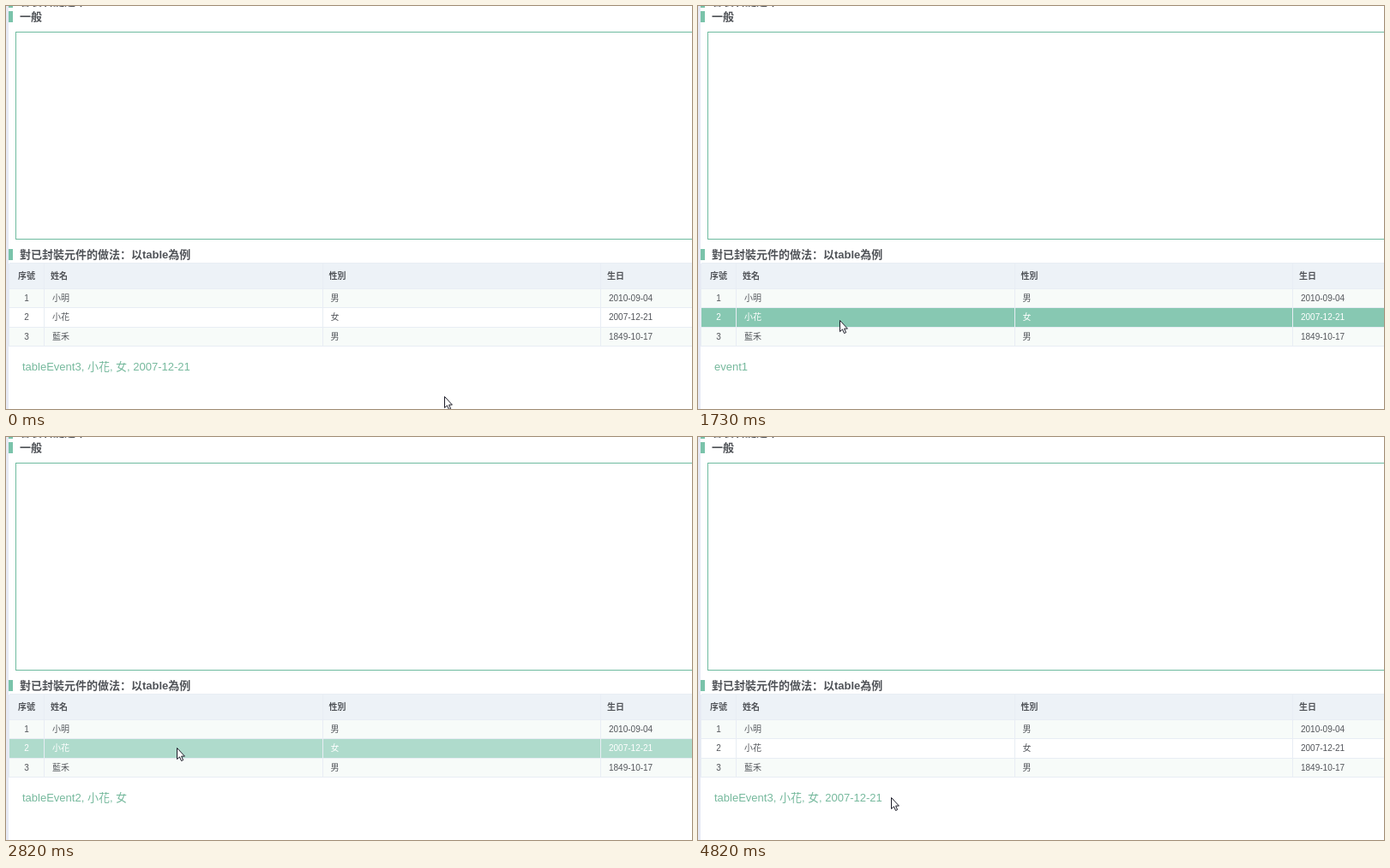
Animation, 800 px wide and 471 px high, one loop 6000 ms. Source, as an HTML page:

```html
<!DOCTYPE html>
<html lang="zh-Hant">
<head>
<meta charset="utf-8">
<title>Context menu</title>
<style>
html, body { margin: 0; width: 100%; height: 100%; overflow: hidden; background: #fff; }
svg { display: block; width: 800px; height: 471px; }
text { font: 10px "Liberation Sans", "Noto Sans CJK TC", "Noto Sans CJK", sans-serif; fill: #53565b; white-space: pre; }
.title { font-size: 13px; font-weight: bold; fill: #505358; font-family: "Liberation Sans", "Noto Sans CJK SC", "Noto Sans CJK", sans-serif; }
.head { font-weight: bold; fill: #505358; }
.mid { text-anchor: middle; }
.row.hover text, .item.hover text { fill: #fff; }
.item text { fill: #44474b; }
.item rect { fill: none; }
.item.hover rect, .glow, .bar { fill: #7ac3aa; }
#message { font-size: 13px; fill: #76b99d; }
rect, .lines { shape-rendering: crispEdges; }
.lines { fill: none; stroke: #e8edf4; }
#menu { filter: drop-shadow(1.5px 1.5px 1px rgba(0, 0, 0, .4)); }
#arrow, #hand { fill: #fff; stroke: #1c1c28; stroke-linejoin: round; }
</style>
</head>
<body>
<svg viewBox="0 0 800 471">
  <rect width="3" height="471" fill="#e6e9f4"/>
  <g class="bar">
    <rect x="3" width="5" height="2"/>
    <rect x="3" y="6" width="5" height="13"/>
    <rect x="3" y="284" width="5" height="13"/>
  </g>
  <g lang="zh-Hans">
    <text class="title" x="16" y="-1.5">客製右鍵選單</text>
    <text class="title" x="16" y="17">一般</text>
    <text class="title" x="16" y="295">對已封裝元件的做法：以table為例</text>
  </g>
  <rect x="11.5" y="30.5" width="800" height="242" fill="none" stroke="#6ebb9f"/>
  <g id="table"></g>
  <text id="message" x="19" y="425.5"></text>
  <g id="menu"></g>
  <g id="cursor">
    <path id="arrow" d="M.5 .5V13.6L3.5 10.9L5.5 15.5L7.6 14.6L5.6 10.1H9.4Z"/>
    <path id="hand" d="M-1.6 11V1.4Q-1.4 0 0 0T1.6 1.4V6Q3 5 4.5 6.4Q6 5.6 7 7Q9 6.6 9 8.8V12.5Q9 15 7.5 16.5V19H-.5V17L-4.8 11.6Q-5.6 9.8-4.2 9.3Q-3 9.2-1.6 11ZM1.6 6V10M4.5 6.6V10M7 7.2V10"/>
  </g>
</svg>
<script>
const $ = id => document.getElementById(id);
const LOOP = 6000, TICKS = 66;
const PICK_TICKS = 4, FADE_STEP = 0.3;
const ROW_HEIGHT = 22.5, TABLE_TOP = 329.6;
const ITEM_HEIGHT = 19, MENU_PADDING = 5;

const HEADS = ['序號', '姓名', '性別', '生日'];
const PEOPLE = [
  ['1', '小明', '男', '2010-09-04'],
  ['2', '小花', '女', '2007-12-21'],
  ['3', '藍禾', '男', '1849-10-17']
];

// Each visit travels to a spot, opens the menu there and picks an item. Times are in ticks.
const START = { x: 511, y: 456 };
const VISITS = [
  { leave: 0, arrive: 4, open: 6, close: 11, spot: { x: 162, y: 171 }, pick: { x: 186, y: 190 }, message: 'event1' },
  { leave: 14, arrive: 17, open: 21, close: 27, spot: { x: 165, y: 367 }, pick: { x: 195, y: 401 }, message: 'tableEvent2, 小花, 女' },
  { leave: 27, arrive: 31, open: 35, close: 39, spot: { x: 199, y: 363 }, pick: { x: 209, y: 374 }, message: 'tableEvent1, 小花' },
  { leave: 44, arrive: 46, open: 47, close: 53, spot: { x: 210, y: 374 }, pick: { x: 225, y: 421 }, message: 'tableEvent3, 小花, 女, 2007-12-21' }
];

const label = (x, y, s, cls = '') => `<text class="${cls}" x="${x}" y="${y}">${s}</text>`;
const rect = (x, y, w, h, fill) => `<rect x="${x}" y="${y}" width="${w}" height="${h}" fill="${fill}"/>`;
const columnX = i => 44 + 324.5 * (i - 1);
const rowY = r => Math.round(TABLE_TOP + ROW_HEIGHT * r);
const cell = (s, i, y, inset, cls = '') =>
  i ? label(columnX(i) + inset, y, s, cls) : label(24, y, s, cls + ' mid');

function buildTable() {
  const heads = HEADS.map((s, i) => cell(s, i, 318.5, 8, 'head')).join('');
  const rows = PEOPLE.map((cells, r) => {
    const y = rowY(r) + 1, h = rowY(r + 1) - y;
    return `<g class="row">${rect(4, y, 796, h, r % 2 ? '#fff' : '#f7fbf9')}
      <rect class="glow" x="4" y="${y}" width="796" height="${h}"/>
      ${cells.map((s, i) => cell(s, i, 344.5 + ROW_HEIGHT * r, 10)).join('')}</g>`;
  }).join('');
  let lines = 'M3.5 300.5V398M4 300.5H800';
  for (let i = 1; i < HEADS.length; i++) lines += `M${Math.round(columnX(i)) + 0.5} 300.5V398`;
  for (let r = 0; r <= PEOPLE.length; r++) lines += `M4 ${rowY(r) + 0.5}H800`;
  $('table').innerHTML = rect(4, 301, 796, 29, '#edf2f7') + heads + rows + `<path class="lines" d="${lines}"/>`;
}

function buildMenu() {
  const items = [0, 1, 2].map(i => {
    const y = MENU_PADDING + ITEM_HEIGHT * i;
    return `<g class="item"><rect x="1" y="${y}" width="136" height="${ITEM_HEIGHT}"/>${label(13, y + 13, '功能' + (i + 1))}</g>`;
  });
  $('menu').innerHTML = '<rect x=".5" y=".5" width="136" height="67" fill="#fff" stroke="#d4d4d4"/>' + items.join('');
}

const clamp = x => Math.min(1, Math.max(0, x));
const smooth = x => x * x * (3 - 2 * x);
const easeOut = x => 1 - (1 - x) ** 3;
const glide = (a, b, k) => ({ x: a.x + (b.x - a.x) * k, y: a.y + (b.y - a.y) * k });

function cursorAt(t) {
  return VISITS.reduce((from, v) => {
    const travelled = glide(from, v.spot, smooth(clamp((t - v.leave) / (v.arrive - v.leave))));
    return glide(travelled, v.pick, easeOut(clamp((t - v.open) / PICK_TICKS)));
  }, START);
}

// What the pointer touches at a tick: the open menu, its item, or a table row.
function sceneAt(t) {
  const cursor = cursorAt(t);
  const menu = VISITS.find(v => t >= v.open && t < v.close);
  const item = menu ? Math.floor((cursor.y - menu.spot.y - MENU_PADDING) / ITEM_HEIGHT) : -1;
  const row = item < 0 ? Math.floor((cursor.y - TABLE_TOP) / ROW_HEIGHT) : -1;
  return { cursor, menu, item, row };
}

function glowAt(r, t) {
  let glow = 0;
  for (let i = 0; i <= t; i++) glow = clamp(glow + (sceneAt(i).row === r ? FADE_STEP : -FADE_STEP));
  return glow;
}

const show = (el, on) => { el.style.display = on ? '' : 'none'; };
const place = (el, p) => el.setAttribute('transform', `translate(${Math.round(p.x)} ${Math.round(p.y)})`);

buildTable();
buildMenu();
const rows = [...document.querySelectorAll('.row')];
const items = [...document.querySelectorAll('.item')];

function draw(t) {
  const { cursor, menu, item, row } = sceneAt(t);
  rows.forEach((el, r) => {
    el.classList.toggle('hover', r === row);
    el.querySelector('.glow').style.opacity = glowAt(r, t);
  });
  items.forEach((el, i) => el.classList.toggle('hover', i === item));

  show($('menu'), menu);
  if (menu) place($('menu'), menu.spot);
  place($('cursor'), cursor);
  show($('hand'), item >= 0);
  show($('arrow'), item < 0);

  const latest = VISITS.filter(v => v.close <= t).pop() || VISITS[VISITS.length - 1];
  $('message').textContent = latest.message;
}

const start = performance.now();
function tick() {
  const ms = (performance.now() - start) % LOOP;
  draw(Math.floor((ms + 5) * TICKS / LOOP) % TICKS);
  requestAnimationFrame(tick);
}
tick();
</script>
</body>
</html>
```
